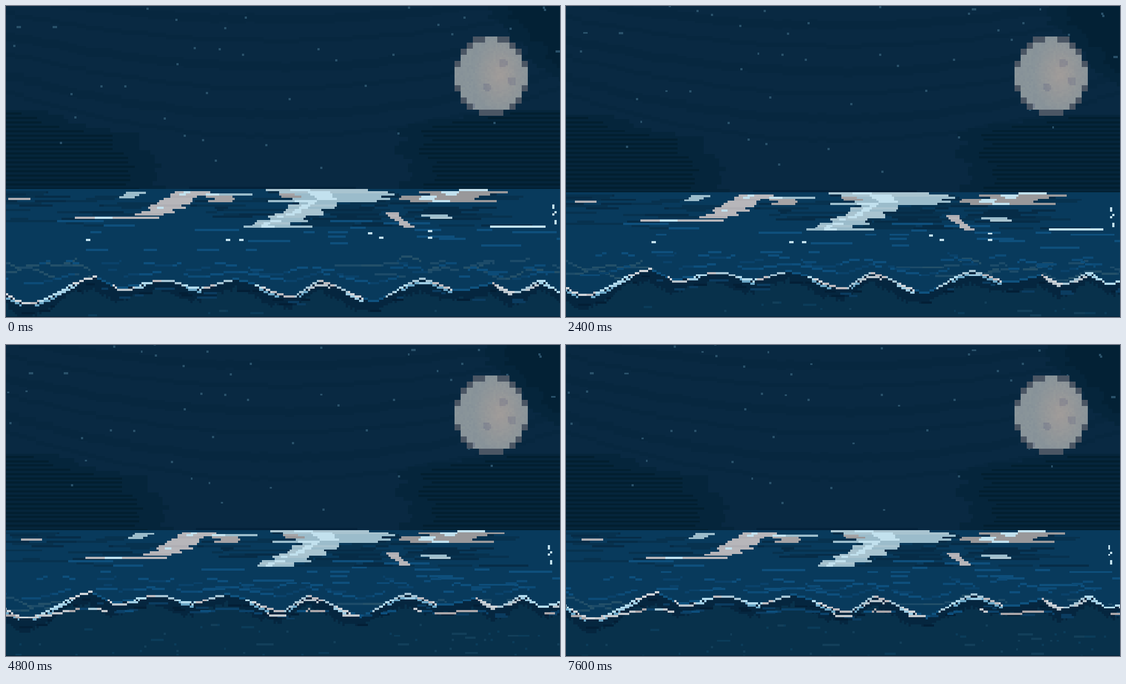
Recreate the animation shown at these times as an HTML page with a canvas. Size 998 by 561 pixels, loop 8000 ms.

```html
<!DOCTYPE html>
<html lang="en">
<head>
<meta charset="utf-8">
<title>Night sea</title>
<style>
html, body { margin: 0; width: 100%; height: 100%; overflow: hidden; background: #021f30; }
canvas { display: block; width: 998px; height: 561px; }
</style>
</head>
<body>
<canvas id="stage" width="998" height="561"></canvas>
<script>
const ctx = document.getElementById('stage').getContext('2d');
const CELL = 4, STEP = 400, LOOP = 8000, TURN = 6000;

// Camera poses: time, zoom out, scene x, scene y, wave x, wave y
const POSES = [
  [0, 0, 0, 0, 0, 0],
  [1600, .031, 32, 12.5, 5, 8],
  [2400, .016, 12, 11, -6, -6.5],
  [4000, .032, 15, 19, 1, -9.5],
  [4400, .032, 24, 14.5, 9, -26],
  [5600, .03, 20, 13, -26, -31],
  [6000, .03, 16, 15, -32, -33]
];

// Turning points of the near wave, and the stretches without foam
const CREST = [
  [-60, 490], [38, 538], [158, 489], [200, 508], [285, 495], [348, 510], [412, 493], [512, 525],
  [563, 497], [660, 532], [747, 493], [815, 514], [872, 501], [915, 518], [963, 496], [996, 516], [1060, 502]
];
const FOAM_GAPS = [[163, 190], [407, 446], [640, 684], [803, 876]];

const PALE = ['#9bbccb', '#a9c4d0'], PINK = ['#b7b6ba', '#b0afb4'];
const WARM = ['#99989a', '#a5a3a5'], BRIGHT = ['#c2e1ee'];
// Stacks of light streaks: centre of the first and last row, streak length
const GLINTS = [
  [570, 330, 590, 350, 160, PALE],
  [565, 354, 470, 394, 74, PALE],
  [390, 338, 390, 338, 110, PALE],
  [490, 396, 490, 396, 150, PALE],
  [338, 334, 262, 376, 54, PINK],
  [200, 380, 200, 380, 150, PINK],
  [390, 342, 392, 350, 40, WARM],
  [505, 338, 510, 342, 34, WARM],
  [810, 334, 790, 350, 130, WARM],
  [848, 330, 848, 330, 66, BRIGHT],
  [692, 372, 722, 396, 20, PINK],
  [770, 376, 790, 380, 46, PALE],
  [235, 335, 220, 343, 32, PALE],
  [25, 346, 25, 346, 48, PINK],
  [910, 396, 910, 396, 105, BRIGHT],
  [987, 358, 990, 390, 4, BRIGHT]
];

function seeded(seed) {
  return () => {
    seed = (seed + 0x6D2B79F5) | 0;
    let h = Math.imul(seed ^ seed >>> 15, 1 | seed);
    h = h + Math.imul(h ^ h >>> 7, 61 | h) ^ h;
    return ((h ^ h >>> 14) >>> 0) / 4294967296;
  };
}
const snap = v => Math.round(v / CELL) * CELL;
const mix = (a, b, u) => a + (b - a) * u;
const pick = (list, rnd) => list[Math.floor(rnd() * list.length)];

// Neighbouring entries around a key, and how far the key lies between them
function between(list, key) {
  let i = 1;
  while (i < list.length - 1 && list[i][0] < key) i++;
  const a = list[i - 1], b = list[i];
  return [a, b, (key - a[0]) / (b[0] - a[0])];
}

function poseAt(t) {
  const [a, b, u] = between(POSES, t);
  return a.map((v, k) => mix(v, b[k], u));
}

function crestAt(x) {
  const [a, b, u] = between(CREST, x);
  const eased = (1 - Math.cos(Math.PI * u)) / 2;
  return mix(a[1], b[1], mix(u, eased, .6));
}

function box(x, y, w, h, color) {
  ctx.fillStyle = color;
  ctx.fillRect(x, y, w, h);
}

// A layer paints scene-space boxes with crisp edges
function layer(zoom, dx, dy) {
  const s = 1 - zoom;
  return (x, y, w, h, color) => {
    const l = Math.round(x * s + dx), t = Math.round(y * s + dy);
    box(l, t, Math.round((x + w) * s + dx) - l, Math.round((y + h) * s + dy) - t, color);
  };
}

// Stepped line along a curve, broken into short runs of colour
function trace(put, curve, colors, seed, fill, skip = () => false) {
  const rnd = seeded(seed);
  let left = 0, on = true, tone;
  for (let x = -60; x < 1060; x += CELL) {
    if (left-- <= 0) {
      left = 2 + rnd() * 7;
      on = rnd() < fill;
      tone = pick(colors, rnd);
    }
    if (on && !skip(x)) put(x, snap(curve(x)) - 2, CELL, CELL, tone);
  }
}

function drawSky(put) {
  const rnd = seeded(11), night = '#021f30', dusk = '#05253b';
  box(0, 0, 998, 561, '#092942');
  for (let band = 0; band < 6; band++) {
    const y = band * 36 - 28, sag = 42 + band * 7, h = band % 2 ? 8 : 16;
    for (let x = -64; x < 1080; x += 16) {
      const bow = 1 - ((x - 480) / 480) ** 2;
      put(x, snap(y + sag * bow + rnd() * 3), 16, h, '#07273f');
    }
  }
  for (let y = 192; y < 330; y += 8) {
    const depth = Math.min(1, (y - 184) / 50);
    const left = snap(185 * depth ** 1.6 + (y > 262 ? 25 : 0) + rnd() * 32);
    const right = snap(728 + 190 * Math.max(0, 1 - depth * 1.6) + rnd() * 34);
    put(-60, y - 4, left + 108, 8, dusk);
    put(-60, y, left + 60, 8, night);
    put(right - 28, y - 4, 1100 - right, 8, dusk);
    put(right + 16, y, 1100 - right, 8, night);
  }
  for (let y = -40; y < 130; y += 8) {
    const x = snap(890 + Math.max(0, y - 20) + rnd() * 24);
    put(x - 24, y, 1100 - x, 8, dusk);
    put(x + 12, y, 1100 - x, 8, '#032135');
  }
  put(330, 326, 300, CELL, '#04223a');
  for (let i = 0; i < 54; i++) {
    const x = rnd() * 1060 - 40, y = 325 * rnd() ** 1.3 - 25;
    put(x, y, i % 14 ? 4 : 8, 4, '#29516a');
  }
}

function drawMoon() {
  const rnd = seeded(5), size = 11, left = 808, top = 55;
  const craters = [[895, 103, 8], [912, 136, 8], [866, 146, 8], [842, 180, 5]];
  const reach = (x, y) => Math.hypot((x - 874) / 67, (y - 126) / 72);
  for (let y = top; y < top + 13 * size; y += size) {
    for (let x = left; x < left + 12 * size; x += size) {
      const r = reach(x + size / 2, y + size / 2);
      if (r > 1) continue;
      if (r > .92) { box(x, y, size, size, '#4b5664'); continue; }
      for (let k = 0; k < 9; k++) {
        const px = x + (k % 3) * 4, py = y + Math.floor(k / 3) * 4;
        const warm = Math.max(0, 1 - Math.hypot((px - 889) / 50, (py - 122) / 70));
        const pit = craters.some(([cx, cy, cr]) => Math.hypot(px + 2 - cx, py + 2 - cy) < cr) ? 15 : 0;
        const n = rnd() * 5 - pit;
        const rgb = [134 + warm * 24 + n, 145 + warm * 8 + n, 152 + n / 2].map(Math.round);
        box(px, py, Math.min(4, x + size - px), Math.min(4, y + size - py), `rgb(${rgb})`);
      }
    }
  }
}

function drawSea(put, lowest) {
  const rnd = seeded(23);
  put(-80, 330, 1240, 330, '#083a5c');
  for (let i = 0; i < 150; i++) {
    const x = i % 5 ? 250 + (rnd() + rnd()) * 340 : rnd() * 250 - 40;
    put(snap(x), 334 + Math.floor(rnd() * 16) * CELL, snap(20 + rnd() * 80), CELL, pick(['#062c47', '#07324f'], rnd));
  }
  for (let i = 0; i < 26; i++) {
    put(snap(rnd() * 1000), snap(378 + rnd() * 70) + 2, snap(16 + rnd() * 70), CELL, '#0e4f7c');
  }
  for (const [x0, y0, x1, y1, length, tones] of GLINTS) {
    for (let y = y0; y <= y1; y += CELL) {
      const w = Math.max(CELL, snap(length * (.75 + rnd() * .5)));
      const x = mix(x0, x1, y1 > y0 ? (y - y0) / (y1 - y0) : 0) + (rnd() - .5) * length * .3;
      const tone = pick(tones, rnd);
      if (y > lowest || length === CELL && rnd() < .4) continue;
      put(snap(x - w / 2), y, w, CELL, tone);
      if (w > 60) put(snap(x - w / 4), y, snap(w / 5), CELL, BRIGHT[0]);
    }
  }
  for (let i = 0; i < 7; i++) {
    const x = snap(100 + rnd() * 700), y = 404 + Math.floor(rnd() * 5) * CELL;
    if (y <= lowest) put(x, y, 8, CELL, BRIGHT[0]);
  }
  for (let i = 0; i < 3; i++) {
    const haze = x => 463 + i * 9 + 7 * Math.sin(x / 31 + i * 2) + 4 * Math.sin(x / 13 + i);
    trace(put, haze, ['#235069', '#1c4b69'], 40 + i, .55, x => x > 150 && x < 590);
  }
}

function drawWave(put, churned) {
  const rnd = seeded(31);
  for (let i = 0; i < 3; i++) {
    const swell = x => mix(crestAt(x + 30 * i), 478, .5) - 6 - i * 10;
    trace(put, swell, ['#0d4f7d', '#0c4b77', '#0a426a'], 60 + i, .5 - i * .12);
  }
  for (let x = -60; x < 1072; x += CELL) {
    const y = snap(crestAt(x)), shade = snap(17 + 5 * Math.sin(x / 23) + rnd() * 7);
    put(x, y, CELL, 660 - y, '#08314b');
    put(x, y, CELL, shade, '#05263f');
  }
  for (let i = 0; i < 64; i++) {
    const w = rnd() < .6 ? CELL : 8 + rnd() * 28;
    put(snap(rnd() * 1050), snap(546 + rnd() * 74), snap(w), CELL, pick(['#0b3c5a', '#123f5a'], rnd));
  }
  for (let i = 0; i < 40; i++) {
    const x = snap(rnd() * 1020);
    put(x, snap(crestAt(x) + 8 + rnd() * 10), snap(8 + rnd() * 18), CELL, pick(['#0b3c60', '#031f36'], rnd));
  }
  const bare = x => FOAM_GAPS.some(([a, b]) => x > a && x < b);
  trace(put, crestAt, ['#0f527f'], 81, .75);
  trace(put, x => crestAt(x) + 5, ['#9dcbe2', '#b9c4cc', '#6ba6c6'], 90, .6, bare);
  trace(put, crestAt, ['#cfd4d9', '#bcbabf', '#b3dbed', '#a5c4d4'], 100, .96, bare);
  if (churned) {
    const lower = x => mix(crestAt(x), 532, .65) + 2;
    trace(put, lower, ['#0d4f7d', '#0b426a'], 121, .4);
    trace(put, lower, ['#a9a5a8', '#a8c9d8', '#c3c8cd'], 122, .28);
  }
}

function draw(t) {
  const [, zoom, sx, sy, wx, wy] = poseAt(t);
  const scene = layer(zoom, sx, sy), wave = layer(zoom, wx, wy);
  drawSky(scene);
  drawMoon();
  // The rising wave swallows the lowest glints
  drawSea(scene, 440 + 1.1 * (wy - sy));
  drawWave(wave, wy < -12);
  box(0, 560, 998, 1, '#021f30');
}

let start = null, shown = -1;
function tick(now) {
  if (start === null) start = now;
  const step = Math.floor(((now - start) % LOOP) / STEP);
  if (step !== shown) {
    shown = step;
    const t = step * STEP;
    draw(t > TURN ? 2 * TURN - t : t);
  }
  requestAnimationFrame(tick);
}
draw(0);
requestAnimationFrame(tick);
</script>
</body>
</html>
```
